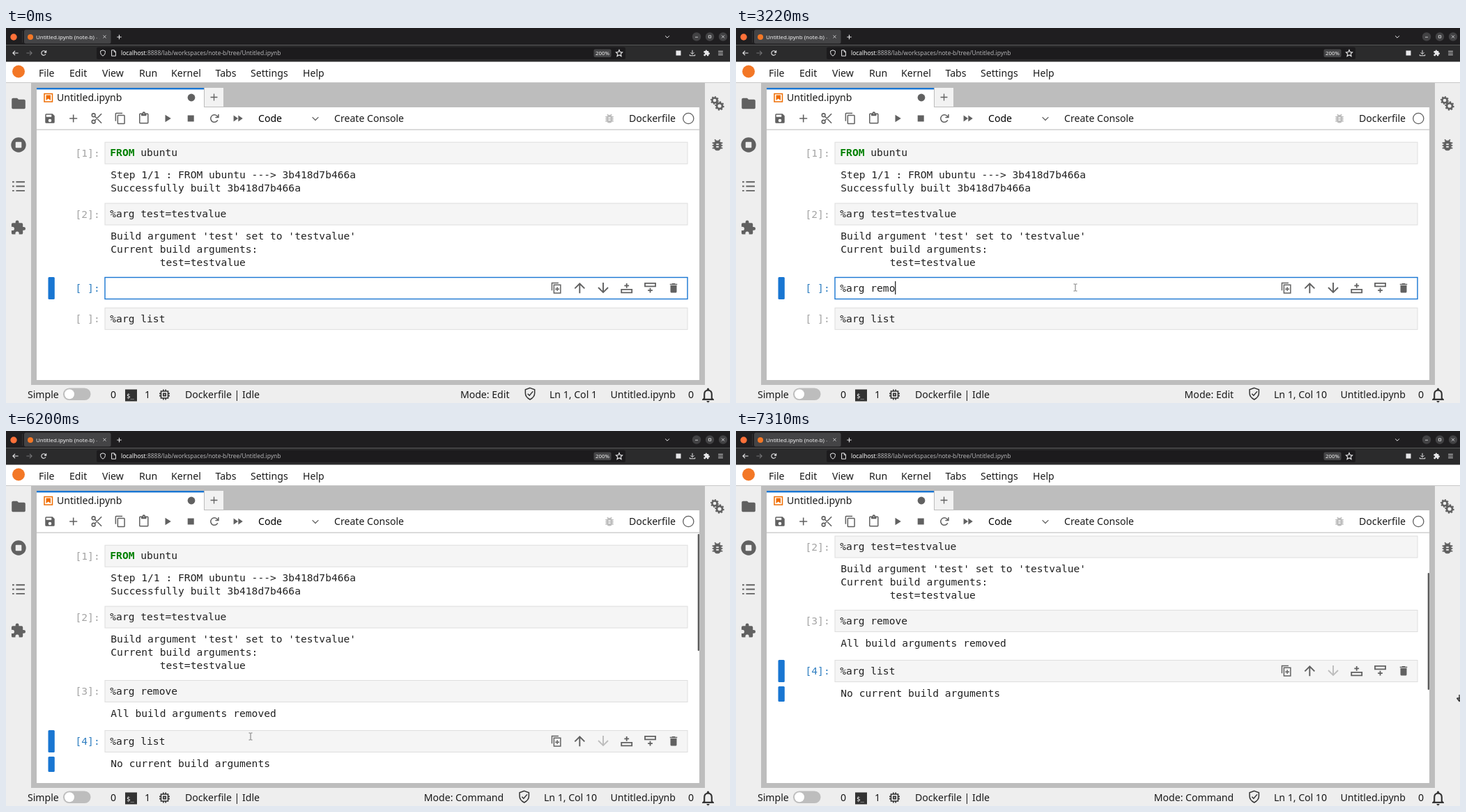
These frames come from a looping animation (1039x539 px, 7940 ms). An HTML page:

```html
<!DOCTYPE html>
<html lang="en">
<head>
<meta charset="utf-8">
<title>Notebook demo</title>
<style>
  html, body { margin: 0; width: 100%; height: 100%; overflow: hidden; background: #eee; }
  svg { display: block; width: 1039px; height: 539px; }
  text { white-space: pre; font: 14.1px "Noto Sans", sans-serif; fill: #1a1a1a; }
  .code { font: 14.62px "DejaVu Sans Mono", monospace; }
  .chrome { font-size: 8.45px; fill: #b4b4b6; }
</style>
</head>
<body>
<svg viewBox="0 0 1039 539">
  <defs>
    <clipPath id="page"><rect x="44" y="147" width="951" height="359"/></clipPath>
    <linearGradient id="fade"><stop offset="0" stop-color="#444446" stop-opacity="0"/><stop offset="1" stop-color="#444446"/></linearGradient>
  </defs>
  <g id="frame"></g>
  <g id="live"></g>
</svg>
<script>
const LOOP = 7940;
const GREY = '#616161', BLUE = '#1976d2', PALE = '#bdbdbd';

// Icons on a 24-unit grid; those in LINES are stroked, the others filled.
const ICONS = {
  folder: 'M10 4H4C3 4 2 5 2 6V18C2 19 3 20 4 20H20C21 20 22 19 22 18V8C22 7 21 6 20 6H12Z',
  save: 'M17 3H5Q3 3 3 5V19Q3 21 5 21H19Q21 21 21 19V7ZM12 19A3 3 0 1 1 12 13 3 3 0 0 1 12 19ZM15 9H5V5H15Z',
  copy: 'M16 1H4Q2 1 2 3V17H4V3H16ZM19 5H8Q6 5 6 7V21Q6 23 8 23H19Q21 23 21 21V7Q21 5 19 5ZM19 21H8V7H19Z',
  paste: 'M19 2H15A3 3 0 0 0 9 2H5Q3 2 3 4V20Q3 22 5 22H19Q21 22 21 20V4Q21 2 19 2ZM12 2A1 1 0 0 1 12 4 1 1 0 0 1 12 2ZM19 20H5V4H7V7H17V4H19Z',
  play: 'M8 5V19L19 12Z',
  stop: 'M6 6H18V18H6Z',
  forward: 'M4 18L12.5 12L4 6ZM13 6V18L21.5 12Z',
  puzzle: 'M20.5 11H19V7Q19 5 17 5H13V3.5A2.5 2.5 0 0 0 8 3.5V5H4Q2 5 2 7V10.8H3.5A2.7 2.7 0 0 1 3.5 16.2H2V20Q2 22 4 22H7.8V20.5A2.7 2.7 0 0 1 13.2 20.5V22H17Q19 22 19 20V16H20.5A2.5 2.5 0 0 0 20.5 11Z',
  bug: 'M4 8H7L8.6 6 7 4.4 8.4 3 10.6 5.2H13.4L15.6 3 17 4.4 15.4 6 17.2 8H20V10H18V12H20V14H18V16H20V18H17.2A6 6 0 0 1 6.8 18H4V16H6V14H4V12H6V10H4ZM10 10V12H14V10ZM10 14V16H14V14Z',
  trash: 'M6 7H18V19Q18 21 16 21H8Q6 21 6 19ZM5 4H8.5L9.5 3H14.5L15.5 4H19V6H5Z',
  up: 'M4 12L5.4 13.4 11 7.8V20H13V7.8L18.6 13.4 20 12 12 4Z',
  down: 'M4 12L5.4 10.6 11 16.2V4H13V16.2L18.6 10.6 20 12 12 20Z',
  bell: 'M10 20H14A2 2 0 0 1 10 20ZM18 16V11Q18 6 13.5 4.7V4A1.5 1.5 0 0 0 10.5 4V4.7Q6 6 6 11V16L4 18V19H20V18ZM16 17H8V11Q8 6.5 12 6.5T16 11Z',
  chip: 'M5 5H9V3H11V5H13V3H15V5H19V9H21V11H19V13H21V15H19V19H15V21H13V19H11V21H9V19H5V15H3V13H5V11H3V9H5ZM7 7V17H17V7ZM9 9H15V15H9ZM11 11V13H13V11Z',
  plus: 'M12 5V19M5 12H19',
  cross: 'M6 6L18 18M18 6L6 18',
  cut: 'M8.5 8.5L20.5 20.5M8.5 15.5L20.5 3.5M9 6A3 3 0 1 1 3 6 3 3 0 0 1 9 6ZM9 18A3 3 0 1 1 3 18 3 3 0 0 1 9 18Z',
  reload: 'M18.5 15A7 7 0 1 1 17 7L19 9M20 4V10H14',
  chevron: 'M5 9L12 16L19 9',
  left: 'M21 12H4M11 5L4 12L11 19',
  right: 'M3 12H20M13 5L20 12L13 19',
  shield: 'M12 2L20 5V11Q20 18 12 22Q4 18 4 11V5Z',
  check: 'M12 2L20 5V11Q20 18 12 22Q4 18 4 11V5ZM8 12L11 15L17 8',
  sheet: 'M5 2H14L19 7V22H5ZM14 2V8H19',
  star: 'M12 2L15 9L22 9.5L17 14.5L18.5 22L12 18L5.5 22L7 14.5L2 9.5L9 9Z',
  download: 'M12 2V15M6 10L12 16L18 10M3 17V21H21V17',
  menu: 'M3 5H21M3 12H21M3 19H21',
  dash: 'M6 14H18',
  box: 'M7 7H17V17H7Z',
  list: 'M8 5H22M8 12H22M8 19H22M2 5H5M2 12H5M2 19H5',
  clone: 'M3 17V2H16M7 6H20V22H7ZM13.5 10V18M9.5 14H17.5',
  above: 'M2 15H22V21H2ZM12 3V12M7.5 7.5H16.5',
  below: 'M2 3H22V9H2ZM12 12V21M7.5 16.5H16.5'
};
const LINES = ('plus cross cut reload chevron left right shield check sheet star download ' +
  'menu dash box list clone above below').split(' ');

const rect = (x, y, w, h, fill, more = '') =>
  `<rect x="${x}" y="${y}" width="${w}" height="${h}" fill="${fill}" ${more}/>`;
const dot = (x, y, r, fill, more = '') => `<circle cx="${x}" cy="${y}" r="${r}" fill="${fill}" ${more}/>`;
const path = (d, stroke, width = 1) => `<path d="${d}" fill="none" stroke="${stroke}" stroke-width="${width}"/>`;
const text = (x, y, s, more = '') => `<text x="${x}" y="${y}" ${more}>${s}</text>`;
const code = (x, y, s, fill = '#212121') => text(x, y, s, `class="code" style="fill:${fill}"`);
const icon = (name, x, y, size = 18, color = GREY, weight = 2) => {
  const paint = LINES.includes(name)
    ? `fill="none" stroke="${color}" stroke-width="${weight}"` : `fill="${color}" fill-rule="evenodd"`;
  return `<path d="${ICONS[name]}" ${paint} transform="translate(${x} ${y}) scale(${size / 24}) translate(-12 -12)"/>`;
};
const gear = (x, y, r) =>
  dot(x, y, r, 'none', `stroke="${GREY}" stroke-width="${r * .7}"`) +
  dot(x, y, r * 1.45, 'none', `stroke="${GREY}" stroke-width="${r * .45}" pathLength="16" stroke-dasharray="1 1"`);

function browserBar() {
  const light = '#e8e8ea';
  const tool = (name, x, y = 36, size = 10, color = light) => icon(name, x, y, size, color, 2.4);
  return rect(0, 0, 1039, 24.5, '#1f1e20') + rect(0, 24.5, 1039, 24, '#2b2b2c') +
    dot(11, 13, 4.7, '#ff7139') + rect(23, 4, .7, 17, '#3a3a3c') +
    rect(26, 2.5, 124.5, 20, '#444446', 'rx="2.5"') + dot(35, 13, 4, '#f37726') +
    text(43, 15.7, 'Untitled.ipynb (note-b) - .', 'style="font-size:7.95px;fill:#f4f4f5"') +
    rect(126, 4, 10, 17, 'url(#fade)') +
    tool('cross', 141.5, 12.5, 8) + tool('plus', 162.5, 13, 11) + tool('chevron', 949, 12.5, 10) +
    ['dash', 'box', 'cross'].map((n, i) =>
      dot(991 + i * 19, 12.5, 6.2, '#424244') + tool(n, 991 + i * 19, 12.5, 8)).join('') +
    tool('left', 13.5, 36, 11) + tool('right', 33.5, 36, 11, '#747476') + tool('reload', 54, 36, 11) +
    rect(130, 27.5, 759, 17.5, '#1c1b1d', 'rx="2.5"') + tool('shield', 139, 36) + tool('sheet', 154.5, 36) +
    text(165, 39, '<tspan fill="#fafafa">localhost</tspan>:8888/lab/workspaces/note-b/tree/Untitled.ipynb', 'class="chrome"') +
    rect(843.5, 30.5, 25, 11.5, '#454547', 'rx="2"') +
    text(856, 39, '200%', 'class="chrome" text-anchor="middle" style="font-size:7.8px;fill:#f0f0f0"') +
    tool('star', 880, 36, 11) + rect(961.5, 32.5, 7, 7, light) +
    tool('download', 985, 36) + tool('puzzle', 1005.5, 36) + tool('menu', 1025.5, 36, 9);
}

function appFrame() {
  const menu = { File: 47, Edit: 91, View: 138, Run: 191, Kernel: 237, Tabs: 300.5, Settings: 351, Help: 426 };
  return rect(0, 48, 1039, 491, '#eee') + rect(0, 48, 1039, 30, '#fff') + rect(0, 78, 1039, 1, '#c8c8c8') +
    dot(18, 62.5, 9, '#f37726') +
    Object.entries(menu).map(([s, x]) => text(x, 69.5, s)).join('') +
    rect(36, 79, 967, 434, PALE) +
    icon('folder', 18, 108.5, 23.5) + dot(18, 168, 10.7, GREY) + rect(13.7, 163.7, 8.6, 8.6, '#eee', 'rx="1"') +
    icon('list', 18, 227.5, 21.5) + icon('puzzle', 17.5, 287, 23) +
    gear(1017, 104, 3.6) + gear(1024, 112, 4) + icon('bug', 1021, 168, 22) +
    // Document tab and toolbar
    rect(44, 86, 240, 28, '#fff') + rect(44, 86, 240, 2.4, BLUE) +
    rect(285, 86, 27, 27, '#f2f2f2') + icon('plus', 298.5, 99.5, 17, GREY, 1.8) +
    path('M55 94.5H66.5V106H55Z', '#ef6c00', 1.5) + '<path d="M57.5 96.5H64V104L60.7 101.5L57.5 104Z" fill="#ef6c00"/>' +
    text(73, 105.3, 'Untitled.ipynb') + dot(266, 100, 5.4, GREY) +
    rect(44, 114, 951, 392, '#fff') + rect(44, 145.5, 951, 1.2, '#c4c4c4') +
    ['save', 'plus', 'cut', 'copy', 'paste', 'play', 'stop', 'reload', 'forward']
      .map((n, i) => icon(n, 63 + i * 33.7, 130, n == 'cut' || n == 'plus' ? 19 : 18)).join('') +
    text(362, 135.2, 'Code', 'style="fill:#000"') + icon('chevron', 444, 130, 15) +
    text(471, 135.2, 'Create Console') + icon('bug', 866, 130, 17.5, PALE) +
    text(961, 135.2, 'Dockerfile', 'text-anchor="end"') +
    // Status bar
    text(31, 531.7, 'Simple') + rect(82, 517.5, 39.5, 17.5, PALE, 'rx="8.75"') + dot(91, 526.2, 7, '#fff') +
    text(150, 531.7, '0') + rect(171, 519.5, 17, 17, '#333') +
    text(173, 531.5, '$_', 'style="font:9px DejaVu Sans Mono,monospace;fill:#fff"') +
    text(199, 531.7, '1') + icon('chip', 227.5, 527, 20, '#333') +
    text(961, 531.7, 'Untitled.ipynb', 'text-anchor="end"') + text(979, 531.7, '0') +
    icon('bell', 1007.5, 527.5, 25.5, '#333');
}

// Last value whose time has come.
const step = (t, keys) => keys.reduce((v, [at, next]) => t >= at ? next : v, keys[0][1]);
// Linear motion through [time, value] keys.
function tween(t, keys) {
  const i = keys.findIndex(k => k[0] > t);
  if (i < 1) return keys[i < 0 ? keys.length - 1 : 0][1];
  const [a, from] = keys[i - 1], [b, to] = keys[i];
  return from + (to - from) * (t - a) / (b - a);
}
const between = (t, a, b) => t >= a && t < b;

function cell(top, prompt, source, { output = [], active, editing, last } = {}) {
  let s = rect(142, top + .5, 836, 31, editing ? '#fff' : '#f5f5f5',
    `stroke="${editing ? BLUE : '#dedede'}" stroke-width="${editing ? 1.4 : 1}"`) +
    code(99.5, top + 21.2, `[${prompt}]:`, active ? '#307fc1' : '#a4a4a4') + code(149.3, top + 20.7, source) +
    output.map((line, i) => code(150.3, top + 52.5 + i * 19.2, line)).join('');
  if (active) {
    const y = top + 15.7;
    s += rect(60.5, top, 9.3, 32, BLUE, 'rx="1.5"') +
      (output.length ? rect(60.5, top + 38, 9.3, 22, BLUE, 'rx="1.5"') : '') +
      icon('clone', 790, y, 17.5) + icon('up', 823.3, y, 23) + icon('down', 857, y, 23, last ? PALE : GREY) +
      icon('above', 890.7, y, 18, GREY, 2.4) + icon('below', 924.5, y, 18, GREY, 2.4) + icon('trash', 958, y, 18);
  }
  return s;
}

function mouse(t) {
  if (t < 310) return '';
  if (t >= 7310) return path('M1038 379V388M1034.5 384L1038 388.5L1041 385M1034.5 384H1039', '#333', 1.4);
  const x = tween(t, [[4400, 487], [4770, 344], [6070, 344], [6200, 351], [6950, 351], [7150, 560], [7310, 1030]]);
  const y = tween(t, [[4400, 373], [4770, 446], [6070, 446], [6200, 439], [6950, 439], [7150, 428], [7310, 384]]);
  return path(`M${x - 2.5} ${y - 5}h2l.5 .5l.5 -.5h2M${x} ${y - 4.5}v9M${x - 2.5} ${y + 5}h2l.5 -.5l.5 .5h2`, '#777');
}

function live(t) {
  const typed = '%arg remove'.slice(0, step(t, [[0, 0], [2230, 1], [2320, 2], [2410, 3], [2510, 4],
    [2670, 5], [2800, 6], [3220, 9], [3550, 11]]));
  const ran = t >= 4000, onLast = t >= 4950, lastRan = t >= 5830, listed = t >= 6070;
  const busy = between(t, 4000, 4250);
  const editing = !ran || between(t, 4950, 5830);
  const lastTop = ran ? 430 : 401.8;
  const scroll = tween(t, [[6385, 0], [6400, 14], [6470, 52.3], [6570, 52.3], [6700, 80], [6850, 96], [7000, 101]]);

  let cells = cell(163.7, 1, '<tspan font-weight="bold" fill="#008000">FROM</tspan> ubuntu',
      { output: ['Step 1/1 : FROM ubuntu ---&gt; 3b418d7b466a', 'Successfully built 3b418d7b466a'] }) +
    cell(251.5, 2, '%arg test=testvalue',
      { output: ["Build argument 'test' set to 'testvalue'", 'Current build arguments:', '        test=testvalue'] }) +
    cell(358, !ran ? ' ' : busy ? '*' : 3, typed,
      { output: ran ? ['All build arguments removed'] : [], active: !onLast, editing: !ran }) +
    cell(lastTop, listed ? 4 : lastRan ? '*' : ' ', '%arg list',
      { output: listed ? ['No current build arguments'] : [], active: onLast, editing: onLast && !lastRan, last: true });

  if (between(t, 930, 1460) || between(t, 1900, 2020) || between(t, 2230, 4000))
    cells += rect(149 + typed.length * 8.8, 364, 1.1, 19, '#000');
  if (between(t, 5020, 5630)) cells += rect(228.3, 436, 1.1, 18, '#000');

  const thumb = listed ? 168 : ran ? 176 : 184;
  const thumbAlpha = ran ? 1 : tween(t, [[300, 0], [310, .4], [570, 1], [1880, 1], [2020, .25], [2220, .25], [2230, 0]]);
  const column = onLast ? 10 : typed.length + 1;
  const shift = column > 9 ? 8.3 : 0;

  return `<g clip-path="url(#page)"><g transform="translate(0 ${-scroll})">${cells}</g></g>` +
    rect(992.7, 148 + scroll * .555, 2.3, thumb, '#5c5c5c', `rx="1" opacity="${thumbAlpha}"`) +
    dot(979.3, 130, 7.6, busy ? GREY : '#fff', `stroke="${GREY}" stroke-width="1.3"`) +
    text(257, 531.7, `Dockerfile | ${busy ? 'Busy' : 'Idle'}`) +
    text(722.5 - shift, 531.7, `Mode: ${editing ? 'Edit' : 'Command'}`, 'text-anchor="end"') +
    icon('check', 752 - shift, 525.7, 20, '#333', 1.8) +
    text(848, 531.7, `Ln 1, Col ${column}`, 'text-anchor="end"') + mouse(t);
}

document.getElementById('frame').innerHTML = appFrame() + browserBar();
const layer = document.getElementById('live');
let shown = '';
function tick() {
  const markup = live(performance.now() % LOOP);
  if (markup !== shown) layer.innerHTML = shown = markup;
  requestAnimationFrame(tick);
}
tick();
</script>
</body>
</html>
```
